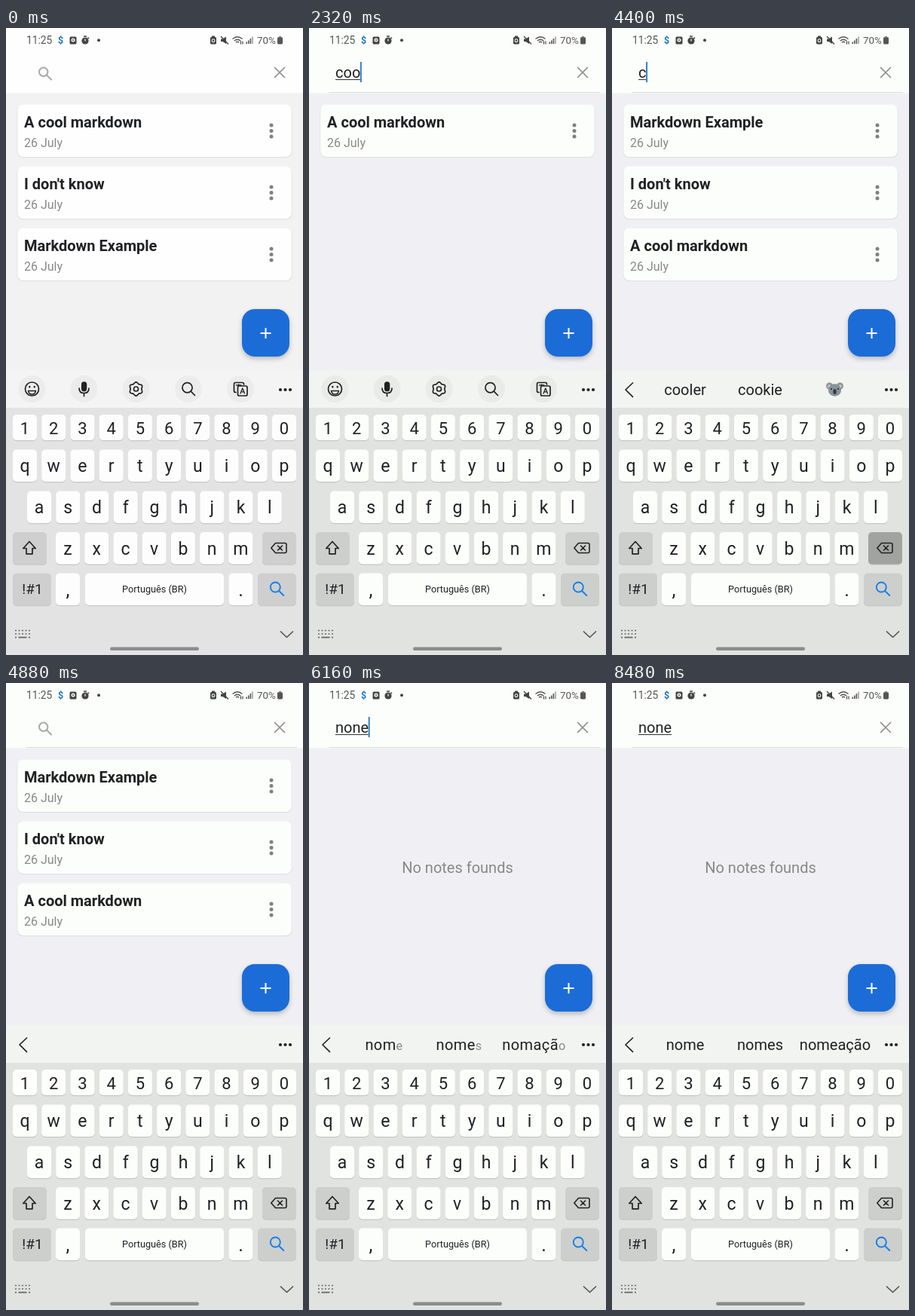
An HTML page for the animation above (8.8 s loop, 394x832 px).

```html
<!DOCTYPE html>
<html lang="en">
<head>
<meta charset="utf-8">
<title>Note search</title>
<style>
  html, body { margin: 0; width: 100%; height: 100%; overflow: hidden; }
  svg { display: block; width: 100%; height: 100%;
    --page: #f0f0f4; --head: #fcfefb; --card: #fcfefb; --edge: #e0e1e2;
    --bar: #f2f4f1; --chip: #e9ebe8; --pad: #e1e3e0; --key: #fcfefb; --fn: #cdcfcc; --shade: #c5c7c4; }
  svg.plain { --page: #f2f2f2; --head: #fefefe; --card: #fefefe; --edge: #e2e2e2;
    --bar: #f4f4f4; --chip: #ececec; --pad: #e3e3e3; --key: #fdfdfd; --fn: #cfcfcf; --shade: #c8c8c8; }
  text { font-family: Roboto, sans-serif; fill: #202124; }
  .mid { text-anchor: middle; }
  .line { fill: none; stroke: #222; stroke-width: 1.7; stroke-linecap: round; stroke-linejoin: round; }
  .dim { fill: #888; }
</style>
</head>
<body>
<svg id="stage" viewBox="0 0 394 832" xmlns="http://www.w3.org/2000/svg">
  <defs>
    <filter id="soft" x="-30%" y="-30%" width="160%" height="170%">
      <feDropShadow dx="0" dy="3" stdDeviation="3" flood-color="#000" flood-opacity=".24"/>
    </filter>
  </defs>
  <rect width="394" height="832" fill="var(--page)"/>
  <rect width="394" height="86.5" fill="var(--head)"/>
  <g id="status"></g>

  <rect id="rule" x="26" y="85" width="360" height="1" fill="#dcdedc"/>
  <g id="hint" class="line" style="stroke:#a9a9a9;stroke-width:2"><circle cx="49.7" cy="58.2" r="5.7"/><path d="M54 62.5L60 68.5"/></g>
  <text id="field" x="35" y="66" font-size="20"></text>
  <rect id="under" x="35" y="68" height="1" fill="#333"/>
  <rect id="caret" y="45" width="2" height="27" fill="#3182c8"/>
  <path d="M356.5 52.5L369.5 65.5M369.5 52.5L356.5 65.5" class="line" style="stroke:#8d8d8d"/>

  <g id="cards"></g>
  <text id="none" class="mid dim" x="197" y="251.5" font-size="20">No notes founds</text>
  <g filter="url(#soft)"><rect x="313" y="373" width="63" height="63" rx="17" fill="#1e6cd8"/></g>
  <path d="M344.5 398V412M337.5 405H351.5" stroke="#fff" stroke-width="2"/>

  <rect y="454" width="394" height="51" fill="var(--bar)"/>
  <g id="tools"></g>
  <g id="hints">
    <path class="line" d="M27.5 471L18 480L27.5 489.3"/>
    <text class="mid word" y="486.5"></text><text class="mid word" y="486.5"></text><text class="mid word" y="486.5"></text>
    <g id="koala">
      <g fill="#8b969c"><circle cx="288.5" cy="475" r="4.5"/><circle cx="302.5" cy="475" r="4.5"/></g>
      <g fill="#c2cacd"><circle cx="288.5" cy="475.5" r="2.2"/><circle cx="302.5" cy="475.5" r="2.2"/></g>
      <ellipse cx="295.5" cy="480.5" rx="8.6" ry="8.2" fill="#87949b"/>
      <ellipse cx="295.5" cy="482.5" rx="2.2" ry="3.6" fill="#333a40"/>
      <g fill="#22282c"><circle cx="291" cy="479" r="1.1"/><circle cx="300" cy="479" r="1.1"/></g>
    </g>
  </g>
  <g fill="#222"><circle cx="364" cy="480" r="2.1"/><circle cx="370.5" cy="480" r="2.1"/><circle cx="377" cy="480" r="2.1"/></g>

  <rect y="504" width="394" height="328" fill="var(--pad)"/>
  <g id="keys"></g>
  <g class="line">
    <path d="M31 681.5L22.8 690.5H27V697.8H35V690.5H39.2Z"/>
    <path d="M357.5 683.5H370Q372 683.5 372 685.5V694.5Q372 696.5 370 696.5H357.5L351.8 690ZM360.5 687L366.5 693M366.5 687L360.5 693" stroke-width="1.6"/>
    <g style="stroke:#167fec;stroke-width:1.9"><circle cx="357.3" cy="742" r="6.5"/><path d="M362.2 747L368.3 753"/></g>
    <path d="M364.5 801L372.5 808.5L380.5 801" style="stroke:#555"/>
    <path d="M12 799.5H32M12 804H32" style="stroke:#666;stroke-dasharray:2 2.5;stroke-linecap:butt"/>
    <path d="M12 808.7H14M16.5 808.7H27.5M30 808.7H32" style="stroke:#666;stroke-linecap:butt"/>
  </g>
  <rect x="138" y="821.5" width="118" height="4.5" rx="2.2" fill="#8b8c8b"/>
</svg>
<script>
const LOOP = 8800, STEP = 80;
const $ = id => document.getElementById(id);
const clamp = v => Math.max(0, Math.min(1, v));
const show = (el, on) => { el.style.opacity = +on; };
const at = (table, t) => table.filter(row => row[0] <= t).pop();

const LISTS = {
  first: ['A cool markdown', "I don't know", 'Markdown Example'],
  match: ['A cool markdown'],
  all: ['Markdown Example', "I don't know", 'A cool markdown'],
  empty: []
};
const TYPED = [[0, ''], [1040, 'c'], [2000, 'co'], [2240, 'coo'], [2880, 'cool'], [3920, 'coo'],
  [4240, 'co'], [4400, 'c'], [4480, ''], [5360, 'n'], [5520, 'no'], [5680, 'non'], [5810, 'none']];
const SHOWN = [[0, 'first'], [2160, 'match'], [4320, 'all'], [5840, 'empty']];
const PRESSES = [['c', 880, 1040], ['o', 1920, 2000], ['o', 2160, 2240], ['l', 2720, 2880],
  ['back', 3840, 4560], ['n', 5280, 5440], ['o', 5450, 5560], ['n', 5610, 5690], ['e', 5740, 5840]];
const WORD_X = [97, 196.5, 296];

function buildStatus() {
  $('status').innerHTML = `
    <text x="27" y="21" font-size="13.8" style="fill:#555">11:25</text>
    <text x="69" y="21" font-size="12.5" font-weight="700" style="fill:#1b74c5">$</text>
    <rect x="84.5" y="11.5" width="9" height="10" rx="1.5" fill="#444"/>
    <circle cx="89" cy="16" r="2.5" fill="#fff"/><circle cx="89" cy="16" r="1" fill="#444"/>
    <circle cx="105" cy="17" r="4.6" fill="#444"/>
    <path d="M103 11H107M108.5 12.5L110 14" stroke="#444" stroke-width="1.6"/>
    <path d="M105 14.5V17.5" stroke="#fff" stroke-width="1.2"/>
    <circle cx="123" cy="16.3" r="2" fill="#444"/>
    <rect x="271" y="12" width="8" height="9.5" rx="1.5" fill="#444"/><path d="M273 11.5H277" stroke="#444" stroke-width="2"/>
    <circle cx="275" cy="16.7" r="1.9" fill="none" stroke="#fff" stroke-width="1.1"/>
    <path d="M285 14.5H287.5L292 11.5V21L287.5 18H285Z" fill="#444"/>
    <path d="M285 11L295 21.5" stroke="#444" stroke-width="1.4"/>
    <g fill="none" stroke="#555" stroke-width="1.4"><path d="M300.5 14.5Q307 9 313.5 14.5M302.8 17Q307 13.5 311.2 17M305 19.2Q307 17.5 309 19.2"/></g>
    <path d="M311.5 17.5V21.5M314 17.5V21.5" stroke="#444" stroke-width="1.2"/>
    <path d="M319.2 21V18.5M321.8 21V16.5M324.4 21V14" stroke="#555" stroke-width="1.6"/>
    <path d="M327 21V11.5" stroke="#999" stroke-width="1.5"/>
    <text x="333" y="21" font-size="13.4" style="fill:#555">70%</text>
    <rect x="360" y="12.3" width="7" height="9.2" rx="1.4" fill="#555"/><path d="M362 11.8H365" stroke="#777" stroke-width="1.6"/>`;
}

function card(title, i) {
  const y = 101 + 82 * i;
  const dots = [28, 35.5, 43].map(d => `<circle cx="352" cy="${y + d}" r="2.5" fill="#808080"/>`).join('');
  return `<rect x="14.5" y="${y + .8}" width="365" height="70.5" rx="8" fill="var(--edge)"/>
    <rect x="15.3" y="${y + .4}" width="363.4" height="69.6" rx="7.5" fill="var(--card)"/>
    <text x="24" y="${y + 31}" font-size="20" font-weight="700">${title}</text>
    <text class="dim" x="24" y="${y + 57}" font-size="16">26 July</text>${dots}`;
}

function buildTools() {
  const gear = Array.from({ length: 72 }, (_, i) => {
    const a = i * Math.PI / 36, r = 8.2 + .9 * Math.cos(6 * a);
    return `${(172.5 + r * Math.sin(a)).toFixed(1)},${(479 - r * Math.cos(a)).toFixed(1)}`;
  }).join(' ');
  const chips = [34.5, 103.5, 172.5, 242, 311]
    .map(x => `<circle cx="${x}" cy="479" r="18" fill="var(--chip)"/>`).join('');
  $('tools').innerHTML = `${chips}<g class="line">
    <circle cx="34.5" cy="479" r="9"/><path d="M29.5 481.5H39.5Q38.5 486 34.5 486T29.5 481.5Z" stroke-width="1.4"/>
    <path d="M31.3 475.8V476.6M37.7 475.8V476.6" stroke-width="2.2"/>
    <rect x="100.8" y="470" width="5.6" height="11.5" rx="2.8" style="fill:#222"/>
    <path d="M97 478Q97 484.5 103.5 484.5T110 478M103.5 485V488.5"/>
    <polygon points="${gear}"/><circle cx="172.5" cy="479" r="3"/>
    <circle cx="240.5" cy="477.3" r="6.6"/><path d="M245.3 482.2L250.5 487.5"/>
    <path d="M305 483.5H304.5Q302.5 483.5 302.5 481.5V472.5Q302.5 470.5 304.5 470.5H313.5Q315.5 470.5 315.5 472.5V473"/>
    <rect x="307.5" y="475" width="12.5" height="13" rx="2"/>
    <path d="M311 485L313.8 478L316.6 485M312 482.8H315.6M305.5 474H312M308.7 472.8V474" stroke-width="1.3"/></g>`;
}

const caps = {};
function buildKeys() {
  let out = '';
  const key = (id, x, y, w, h, fill) => {
    out += `<rect x="${x}" y="${y + 1.2}" width="${w}" height="${h}" rx="5" fill="var(--shade)"/>
      <rect data-id="${id}" data-fill="${fill}" x="${x}" y="${y}" width="${w}" height="${h}" rx="5" fill="var(--${fill})"/>`;
  };
  const label = (s, x, y, size) => { out += `<text class="mid" x="${x}" y="${y}" font-size="${size}">${s}</text>`; };
  const row = (chars, x, y, h, base, size) => [...chars].forEach((c, i) => {
    const cx = x + 38.22 * i;
    key(c, cx - 16, y, 32, h, 'key');
    label(c, cx, base, size);
  });
  row('1234567890', 25, 513, 34, 538.5, 22);
  row('qwertyuiop', 25, 559.5, 42.5, 589, 23);
  row('asdfghjkl', 44, 614.5, 42.5, 644, 23);
  row('zxcvbnm', 82, 669, 42.5, 698.5, 23);
  key('shift', 9, 669, 45, 42.5, 'fn');
  key('back', 340, 669, 45, 42.5, 'fn');
  key('sym', 9, 723.5, 51, 42.5, 'fn');
  key('comma', 66, 723.5, 32, 42.5, 'key');
  key('space', 105, 723.5, 184, 42.5, 'key');
  key('dot', 295.5, 723.5, 32, 42.5, 'key');
  key('find', 334, 723.5, 51, 42.5, 'fn');
  label('!#1', 35, 751, 19);
  label(',', 82, 754, 25);
  label('Português (BR)', 197, 749, 12.7);
  label('.', 311.5, 754, 25);
  $('keys').innerHTML = out;
  $('keys').querySelectorAll('[data-id]').forEach(el => { caps[el.dataset.id] = el; });
}

// Letters of a word grow and darken one after another.
function drawWord(el, x, word, p) {
  const n = word.length, moving = p < 1;
  el.setAttribute('x', x + (moving ? 2.5 : 0));
  el.setAttribute('letter-spacing', moving ? .4 : 0);
  el.innerHTML = [...word].map((c, i) => {
    const k = moving ? clamp(p * n - i) : 1;
    return `<tspan font-size="${12 + 8 * Math.min(1, k * 1.05)}" fill-opacity="${k}">${c}</tspan>`;
  }).join('');
}

const words = [...document.querySelectorAll('.word')];
function drawBar(t) {
  const open = clamp((t - 2880) / 160);
  show($('tools'), 0);
  $('tools').style.opacity = 1 - open;
  $('hints').style.opacity = open;
  let list = ['', '', ''], p = 1, fade = 1, koala = 0;
  if (t >= 2960 && t < 4720) {
    list = ['cooler', 'cookie', ''];
    p = (t - 2960) / 200;
    fade = 1 - clamp((t - 4560) / 160);
    koala = clamp((t - 2960) / 240) * fade;
  } else if (t >= 6080) {
    p = t < 6160 ? .4 : t < 6240 ? .9 : 1;
    list = ['nome', 'nomes', t < 6240 ? 'nomação' : 'nomeação'];
  }
  words.forEach((el, i) => {
    const n = list[i].length;
    drawWord(el, WORD_X[i], list[i], p === .9 ? (n - .5) / n : p);
    el.style.opacity = fade;
  });
  $('koala').style.opacity = koala;
}

let lastList = '';
function draw(t) {
  $('stage').classList.toggle('plain', t < 800);
  show($('rule'), t >= 800);

  const [since, text] = at(TYPED, t);
  const field = $('field');
  field.textContent = text;
  const width = text ? field.getComputedTextLength() : 0;
  $('under').setAttribute('width', width);
  $('caret').setAttribute('x', 34.6 + width);
  show($('caret'), text && (t - since) % 1000 < 500 ? 1 : 0);
  show($('hint'), !text);

  const name = at(SHOWN, t)[1];
  if (name !== lastList) {
    $('cards').innerHTML = LISTS[name].map(card).join('');
    show($('none'), name === 'empty');
    lastList = name;
  }

  for (const id in caps) caps[id].setAttribute('fill', `var(--${caps[id].dataset.fill})`);
  for (const [id, from, to] of PRESSES)
    if (t >= from && t < to) caps[id].setAttribute('fill', id === 'back' ? '#a1a3a0' : '#d0d2cf');

  drawBar(t);
}

buildStatus();
buildTools();
buildKeys();
words.forEach(el => el.setAttribute('font-size', 20));
const start = performance.now();
function tick() {
  const t = (performance.now() - start) % LOOP;
  draw(Math.floor(t / STEP) * STEP);
  requestAnimationFrame(tick);
}
draw(0);
requestAnimationFrame(tick);
</script>
</body>
</html>
```
